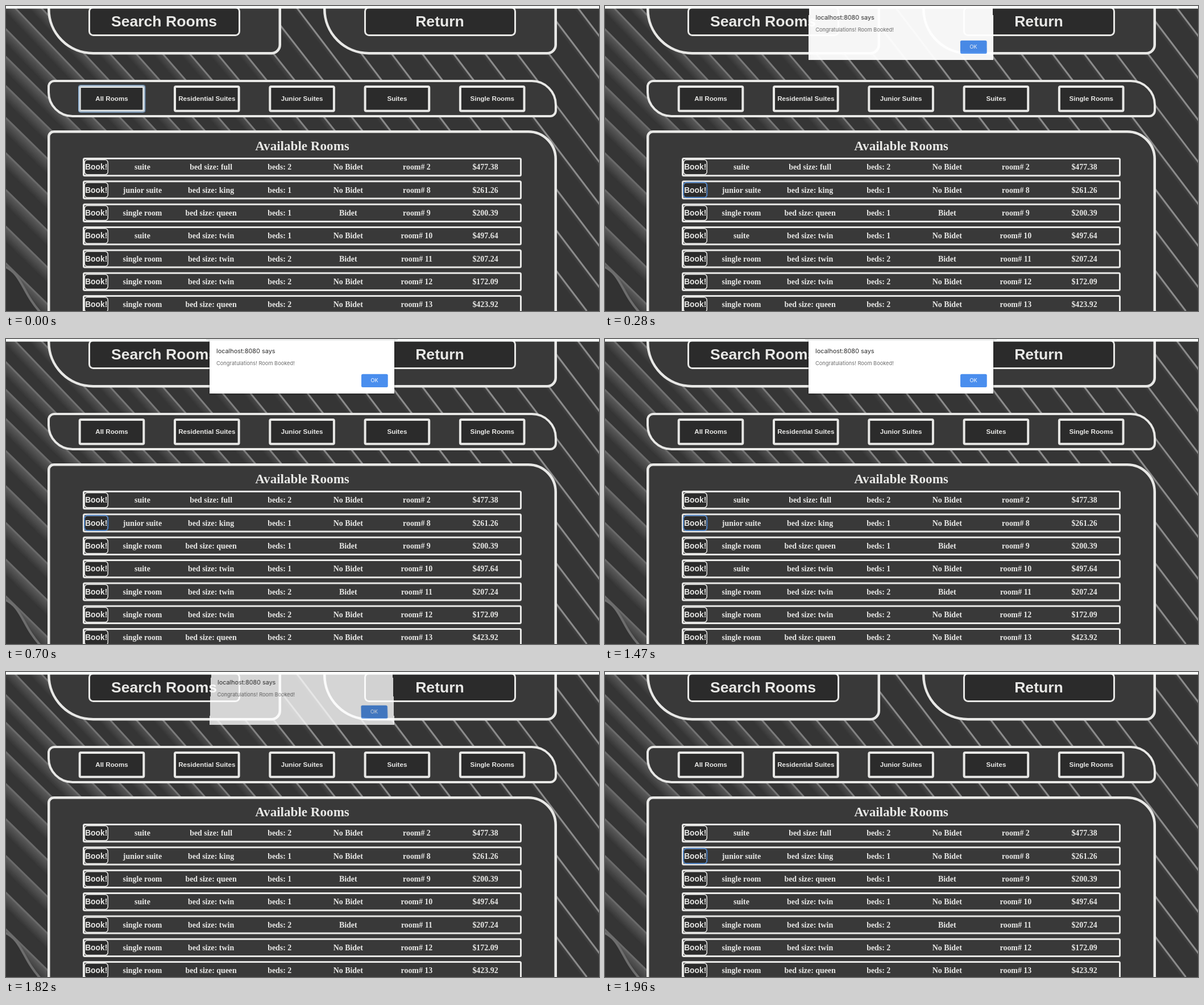
An HTML page with a canvas that plays this animation: 1043x537 px, repeating every 2.03 s.

```html
<!DOCTYPE html>
<html lang="en">
<head>
<meta charset="utf-8">
<title>Available Rooms</title>
<style>
html, body { margin: 0; width: 100%; height: 100%; overflow: hidden; background: #333; }
canvas { display: block; }
</style>
</head>
<body>
<canvas id="stage" width="1043" height="537"></canvas>
<script>
const W = 1043, H = 537, LOOP = 2030, STEP = 70;
const SANS = '"Liberation Sans", Arial, sans-serif';
const SERIF = '"Liberation Serif", Times, serif';
const UI = 'Inter, Roboto, sans-serif';
const LIGHT = '#e8e8e6', PANEL = '#393939', DARK = '#2b2b2b', BLUE = '#3a74bd';

const ctx = document.getElementById('stage').getContext('2d');

// Bordered box given by its outer edges; radii run clockwise from top left.
function box(g, x, y, w, h, line, radii, fill, color = LIGHT) {
  g.beginPath();
  g.roundRect(x + line / 2, y + line / 2, w - line, h - line, radii);
  if (fill) {
    g.fillStyle = fill;
    g.fill();
  }
  g.lineWidth = line;
  g.strokeStyle = color;
  g.stroke();
}

function text(g, str, x, y, font, color = LIGHT, align = 'center') {
  g.font = font;
  g.fillStyle = color;
  g.textAlign = align;
  g.fillText(str, x, y);
}

const clamp = v => Math.max(0, Math.min(1, v));
const mix = (a, b, k) => a + (b - a) * k;
const gray = v => `rgb(${v},${v},${v})`;

// One slanted fin: a soft band on its left that brightens up to a crisp edge.
function drawFin(g, x) {
  const right = clamp(x / 600);
  const slope = mix(0.98, 1.32, right);
  const band = mix(28, 8, right);
  const top = x - 107 / slope, bottom = x + (H - 107) / slope;
  const stroke = (shift, width, color) => {
    g.lineWidth = width;
    g.strokeStyle = color;
    g.beginPath();
    g.moveTo(top + shift, 0);
    g.lineTo(bottom + shift, H);
    g.stroke();
  };
  for (let k = band; k >= 0; k--) {
    stroke(-k, 2, gray(Math.round(mix(mix(92, 68, right), 53, k / band))));
  }
  stroke(0, 3, gray(Math.round(mix(106, 140, right))));
}

function drawFins(g) {
  g.fillStyle = '#353535';
  g.fillRect(0, 0, W, H);
  for (let x = 115; x < 1180; x += mix(44, 56, clamp((x - 115) / 700))) drawFin(g, x);
  for (let x = 65; x > -460; x -= mix(66, 46, clamp((x + 120) / 200))) drawFin(g, x);
  // Curved fin in the lower left corner.
  g.beginPath();
  g.moveTo(-4, 458);
  g.bezierCurveTo(28, 470, 28, 505, 62, 541);
  g.lineTo(-4, 541);
  g.closePath();
  g.fillStyle = '#323232';
  g.fill();
  g.lineWidth = 4;
  g.strokeStyle = '#6e6e6e';
  g.stroke();
}

const tabs = ['All Rooms', 'Residential Suites', 'Junior Suites', 'Suites', 'Single Rooms'];
const rooms = [
  ['suite', 'full', 2, 'No Bidet', 2, '477.38'],
  ['junior suite', 'king', 1, 'No Bidet', 8, '261.26'],
  ['single room', 'queen', 1, 'Bidet', 9, '200.39'],
  ['suite', 'twin', 1, 'No Bidet', 10, '497.64'],
  ['single room', 'twin', 2, 'Bidet', 11, '207.24'],
  ['single room', 'twin', 2, 'No Bidet', 12, '172.09'],
  ['single room', 'queen', 2, 'No Bidet', 13, '423.92']
];

function drawRoom(g, room, i) {
  const y = 267 + i * 40.35;
  const [type, size, beds, bidet, number, cost] = room;
  const cells = [type, `bed size: ${size}`, `beds: ${beds}`, bidet, `room# ${number}`, `$${cost}`];
  box(g, 135, y, 772, 33.2, 3, 2);
  box(g, 137.5, y + 3, 42.5, 27.6, 1.5, 5, DARK);
  text(g, 'Book!', 158.7, y + 21.3, `bold 13.8px ${SANS}`);
  cells.forEach((c, n) => text(g, c, 240 + n * 120.6, y + 21.2, `bold 13.9px ${SERIF}`));
}

function drawPage(g) {
  drawFins(g);
  [['Search Rooms', 73], ['Return', 558]].forEach(([label, x]) => {
    box(g, x, -60, 411, 145.5, 4.5, [0, 0, 15, 78], PANEL);
    box(g, x + 72, 1, 267, 52, 3, 7, DARK);
    text(g, label, x + 205, 35.5, `bold 26.6px ${SANS}`);
  });
  g.fillStyle = '#f9fcfb';
  g.fillRect(0, 0, W, 4.6);

  box(g, 73, 130, 896, 66, 4, [10, 42, 10, 42], PANEL);
  tabs.forEach((label, i) => {
    const mid = 186 + i * 167.3;
    box(g, mid - 58.3, 140, 116.6, 46.8, 4, 2, DARK);
    text(g, label, mid, 167, `bold 11.65px ${SANS}`);
  });

  box(g, 73, 219, 896, 400, 4.5, [9, 48, 0, 0], PANEL);
  text(g, 'Available Rooms', 521, 254, `bold 23.1px ${SERIF}`);
  rooms.forEach((room, i) => drawRoom(g, room, i));
}

const SHEET = { x: 358, w: 325, h: 96 };

function drawSheet(g, pressed) {
  g.fillStyle = '#fff';
  g.fillRect(0, 0, SHEET.w, SHEET.h);
  text(g, 'localhost:8080 says', 12, 25, `10.9px ${UI}`, '#2b2b2b', 'left');
  text(g, 'Congratulations! Room Booked!', 12, 46.3, `9.25px ${UI}`, '#6c6c6c', 'left');
  g.fillStyle = pressed ? '#4487e4' : '#4a8eee';
  g.beginPath();
  g.roundRect(267, 61.7, 46.7, 23.2, 2.5);
  g.fill();
  text(g, 'OK', 290, 76.4, `9px ${UI}`, '#fff');
}

function cached(w, h, paint) {
  const c = document.createElement('canvas');
  c.width = w;
  c.height = h;
  paint(c.getContext('2d'));
  return c;
}

const page = cached(W, H, drawPage);
const sheets = [false, true].map(p => cached(SHEET.w, SHEET.h, g => drawSheet(g, p)));

// While partly shown the sheet is raised, see-through and narrower at the top.
function showSheet(img, shown) {
  const rise = Math.round(16 * (1 - shown)), tilt = 0.083 * (1 - shown);
  ctx.save();
  ctx.globalAlpha = shown;
  if (shown === 1) {
    ctx.shadowColor = 'rgba(0,0,0,.4)';
    ctx.shadowBlur = 3;
    ctx.shadowOffsetY = 1;
    ctx.drawImage(img, SHEET.x, 0);
    ctx.shadowColor = 'transparent';
    ctx.fillStyle = '#cfd1d1';
    ctx.fillRect(SHEET.x - 6, 1, SHEET.w + 12, 1);
  } else {
    for (let y = rise; y < SHEET.h; y++) {
      const w = SHEET.w * (1 - tilt * (SHEET.h - y) / SHEET.h);
      ctx.drawImage(img, 0, y, SHEET.w, 1, SHEET.x + (SHEET.w - w) / 2, y - rise, w, 1);
    }
  }
  ctx.restore();
}

const OPEN = 110, PRESS = 1680, CLOSE = 1782, SLIDE = 178;
const ramp = (t, from) => clamp((t - from) / SLIDE);

function draw(now) {
  const t = Math.floor((now % LOOP) / STEP) * STEP;
  const shown = ramp(t, OPEN) - ramp(t, CLOSE);
  const closing = t > CLOSE && shown > 0;
  ctx.drawImage(page, 0, 0);
  if (t < STEP) {
    box(ctx, 127, 138.8, 118.4, 49, 1, 3, null, '#6d9dcc');
    box(ctx, 129, 141, 114.4, 44.8, 0.8, 2, null, '#7fa6cc');
  } else if (!closing) {
    box(ctx, 137.2, 309.8, 43.2, 28.2, 1.7, 5, null, BLUE);
  }
  if (shown > 0) showSheet(sheets[t >= PRESS ? 1 : 0], shown);
}

const start = performance.now();
function tick() {
  draw(performance.now() - start);
  requestAnimationFrame(tick);
}
tick();
</script>
</body>
</html>
```
